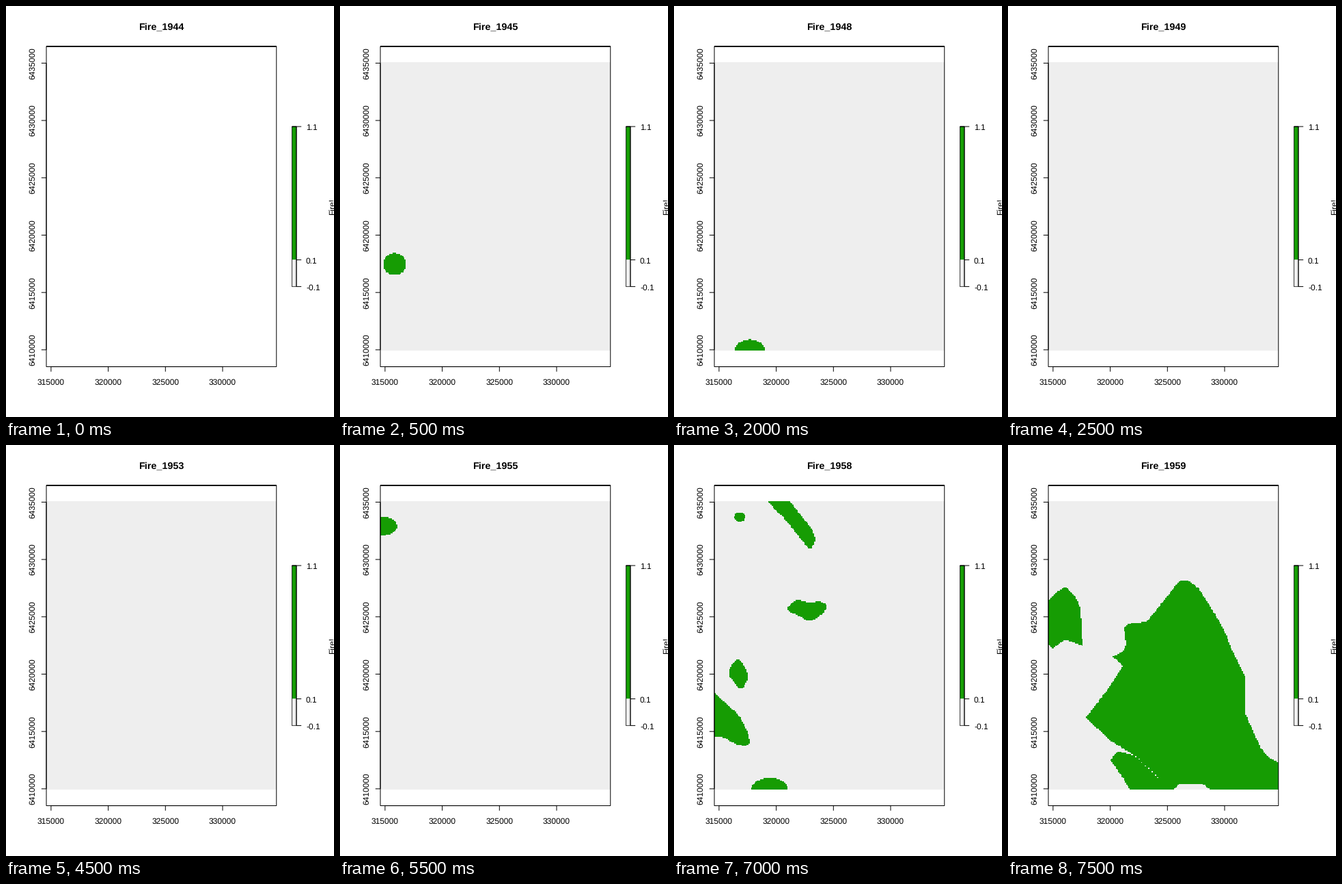
A matplotlib script for the animation above (8 s loop, 480 by 600 pixels).

```python
import numpy as np
import matplotlib.pyplot as plt
from matplotlib.animation import FuncAnimation
from matplotlib.patches import Rectangle
from matplotlib.path import Path

plt.rcParams["font.family"] = "Liberation Sans"
plt.rcParams["text.hinting"] = "none"

W, H, DPI = 480, 600, 100
PX = 72 / DPI
FIRST, YEARS = 1944, 16
GREEN, GREY = (22, 156, 3), (238, 238, 238)

# Plot box, and the map inside it as a grid of square cells
BOX = (59.04, 59.04, 395.76, 526.56)
LEFT, RIGHT, TOP, BOTTOM = 59, 396, 82, 503
COLS, ROWS = 201, 251
X = LEFT + (RIGHT - LEFT) * (np.arange(COLS) + 0.5) / COLS
Y = TOP + (BOTTOM - TOP) * (np.arange(ROWS) + 0.5) / ROWS
gx, gy = np.meshgrid(X, Y)
cells = np.column_stack([gx.ravel(), gy.ravel()])

burnt = np.zeros((YEARS, ROWS, COLS), bool)


def curve(*points, steps=12):
    """Closed smooth line through a few points."""
    p = np.array(points, float)
    ring = np.vstack([p[-1:], p, p[:2]])
    chord = np.hypot(*np.diff(ring, axis=0).T)
    t = np.append(0, np.cumsum(np.sqrt(chord)))
    slope = np.gradient(ring, t, axis=0)
    h = np.diff(t)[1:-1, None]
    a, b = ring[1:-2], ring[2:-1]
    ma, mb = slope[1:-2] * h, slope[2:-1] * h
    u = np.linspace(0, 1, steps, endpoint=False)[:, None, None]
    v = 1 - u
    path = (1 + 2 * u) * v**2 * a + u * v**2 * ma \
        + u**2 * (3 - 2 * u) * b - u**2 * v * mb
    return path.swapaxes(0, 1).reshape(-1, 2)


def burn(year, outline):
    inside = Path(outline).contains_points(cells)
    burnt[year - FIRST] |= inside.reshape(ROWS, COLS)


def burn_oval(year, x, y, rx, ry):
    burnt[year - FIRST] |= ((gx - x) / rx)**2 + ((gy - y) / ry)**2 < 1


burn_oval(1945, 80, 377, 16.5, 16)
burn_oval(1947, 396, 503, 30, 37)
burn_oval(1948, 111, 503, 22, 16)
burn_oval(1955, 62, 118.5, 22, 13.5)
burn_oval(1956, 212, 354, 14.5, 15)

burn_oval(1958, 96, 105, 8, 7)
burn_oval(1958, 140, 503, 27, 17)
burn(1958, curve((134, 76), (160, 76), (186, 103), (203, 126), (206, 139),
                 (199, 151), (188, 140), (163, 109), (146, 92)))
burn(1958, curve((166, 240), (178, 227), (201, 230), (213, 228), (224, 236),
                 (200, 257), (184, 250)))
burn(1958, curve((80, 334), (93, 313), (108, 337), (98, 356), (87, 345)))
burn(1958, curve((40, 352), (77, 378), (98, 400), (110, 436), (95, 438),
                 (69, 426), (40, 424)))

burn(1959, [(59, 227), (72, 214), (84, 207), (98, 220), (106, 238), (109, 293),
            (84, 284), (65, 297), (59, 291)])
burn(1959, [(253, 197), (263, 198), (279, 209), (306, 252), (317, 272),
            (327, 298), (347, 338), (348, 394), (371, 444), (382, 457),
            (397, 464), (397, 503), (296, 503), (285, 495), (251, 495),
            (243, 503), (178, 503), (169, 487), (150, 460), (160, 447),
            (185, 453), (149, 431), (114, 398), (148, 354), (168, 322),
            (153, 309), (168, 302), (173, 291), (170, 267), (177, 261),
            (203, 258), (249, 201)])
# Dotted gap along the seam
for x, y in np.linspace((186, 454), (219, 485), 8):
    burnt[-1, np.searchsorted(Y, y), np.searchsorted(X, x)] = False

fig = plt.figure(figsize=(W / DPI, H / DPI), dpi=DPI, facecolor="white")
ax = fig.add_axes([0, 0, 1, 1])
ax.axis("off")


def line(*points, width=1):
    xs, ys = zip(*points)
    ax.plot(xs, ys, color="black", lw=width * PX, snap=False, zorder=4,
            solid_capstyle="butt", solid_joinstyle="miter")


def frame(x0, y0, x1, y1, width=1):
    line((x0, y0), (x1, y0), (x1, y1), (x0, y1), (x0, y0), (x1, y0),
         width=width)


def label(x, y, s, size=12, **kw):
    kw = {"ha": "center", **kw}
    return ax.text(x, y, s, fontsize=size * PX, va="baseline",
                   rotation_mode="anchor", **kw)


def block(x0, y0, x1, y1, rgb):
    ax.add_patch(Rectangle((x0, y0), x1 - x0, y1 - y0, lw=0, snap=False,
                           facecolor=np.array(rgb) / 255))


def raster(i):
    return np.where(burnt[i][..., None], GREEN, GREY).astype(np.uint8)


area = ax.imshow(raster(0), extent=(LEFT, RIGHT, BOTTOM, TOP),
                 aspect="auto", interpolation="nearest", zorder=1)
ax.set_xlim(0, W)
ax.set_ylim(H, 0)

# Box and axes
x0, y0, x1, y1 = BOX
frame(*BOX)
xticks = 65.9 + 83.7 * np.arange(4)
yticks = 83.4 + 83.7 * np.arange(6)
line((xticks[0], y1), (xticks[-1], y1))
line((x0, yticks[0]), (x0, yticks[-1]))
for i, x in enumerate(xticks):
    line((x, y1), (x, y1 + 7.2))
    label(x, 553, str(315000 + 5000 * i))
for i, y in enumerate(yticks):
    line((x0 - 7.2, y), (x0, y))
    label(42.3, y, str(6435000 - 5000 * i), rotation=90)

# Colour key
block(418.5, 176, 425, 370.5, GREEN)
block(418.5, 370.5, 425, 409.7, GREY)
frame(418.5, 176, 425, 409.7, width=0.75)
line((425, 176), (425, 409.7))
for y, s in ((176, "1.1"), (370.6, "0.1"), (409.6, "-0.1")):
    line((425, y), (432.2, y))
    label(439, y + 4.8, s, ha="left")
label(481, 293, "Fire!", rotation=90)

title = label(227.4, 34, "", size=14.4, weight="bold")


def draw(i):
    title.set_text(f"Fire_{FIRST + i}")
    area.set_data(raster(i))
    area.set_visible(i > 0)
    return title, area


anim = FuncAnimation(fig, draw, frames=YEARS, interval=500, repeat=True,
                     repeat_delay=0, blit=False)
plt.show()
```
